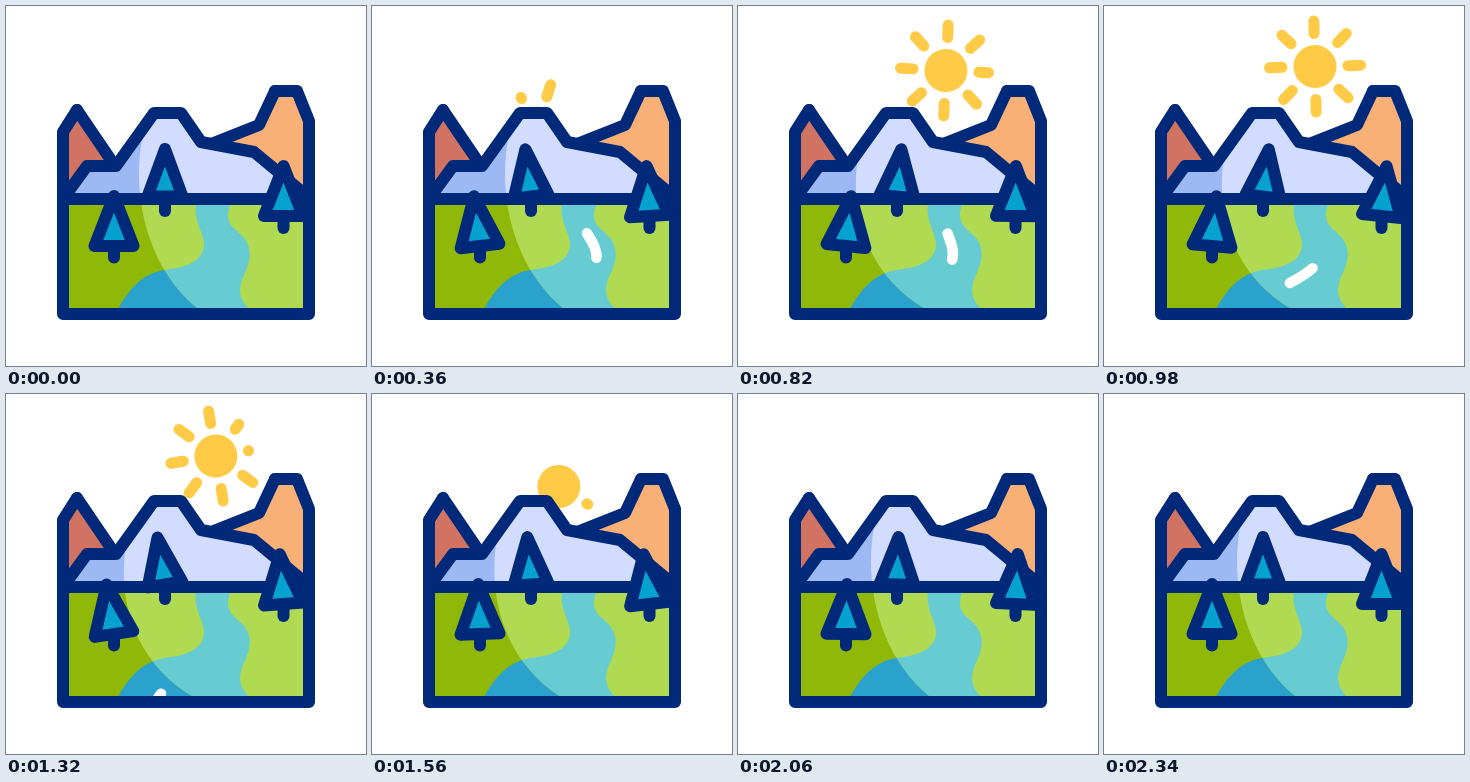
An HTML page for the animation above (2.4 s loop, 360 by 360 pixels).

```html
<!DOCTYPE html>
<html lang="en">
<head>
<meta charset="utf-8">
<title>Sunrise over the valley</title>
<style>
  html, body { margin: 0; width: 100%; height: 100%; overflow: hidden; background: #fff; }
  svg { display: block; width: 100vw; height: 100vh; }
  .line { fill: none; stroke: #00297a; stroke-width: 12; stroke-linecap: round; stroke-linejoin: round; }
  .tree { fill: #06a2cf; }
  .sun { fill: #ffcb47; stroke: #ffcb47; stroke-width: 11; stroke-linecap: round; }
  .glint { fill: none; stroke: #fff; stroke-width: 10.5; stroke-linecap: round; stroke-dasharray: 27 999; }
</style>
</head>
<body>
<svg viewBox="0 0 360 360">
  <defs>
    <path id="peak" d="M62 193V186L81 160H110L148 107H175L195 136L248 146L303 192V193Z"/>
    <path id="land" d="M57 193H303V308H57Z"/>
    <path id="river" d="M190 193V198C187 215 199 228 198 240C196 258 175 262 158 264C135 268 122 285 112 303V308H247L243 303C233 292 232 284 237 271C244 257 247 245 239 233C232 224 222 221 222 209C222 203 224 201 225 193Z"/>
    <clipPath id="shadeClip"><path id="shade"/></clipPath>
    <clipPath id="landClip"><use href="#land"/></clipPath>
  </defs>

  <g id="sun" class="sun"><circle r="21.5" stroke="none"/></g>

  <path fill="#d07363" d="M57 193V126L71 104L107 157L90 193Z"/>
  <path fill="#f8b077" d="M205 138L253 119L269 85H291L303 115V193H248Z"/>
  <path class="line" d="M71 104L107 157M205 138L253 119L269 85"/>

  <use href="#peak" fill="#d2dcfe"/>
  <use href="#land" fill="#b1da53"/>
  <use href="#river" fill="#67ccd1"/>
  <g clip-path="url(#shadeClip)">
    <use href="#peak" fill="#9cb9f3"/>
    <use href="#land" fill="#8fb808"/>
    <use href="#river" fill="#2aa2cd"/>
  </g>

  <g clip-path="url(#landClip)">
    <path id="glintA" class="glint" d="M206 190C206 212 212 222 216 229C222 238 226 246 224 254C219 272 203 278 203 292V340"/>
    <path id="glintB" class="glint" d="M224 190C212 198 204 202 205 210C207 228 218 240 214 254C211 264 195 272 184 278C168 284 160 292 152 304L140 325"/>
  </g>

  <path class="line" d="M62 186L81 160H110L148 107H175L195 136L248 146L300 189M57 193H303"/>
  <path class="line" d="M71 104L57 126V308H303V115L291 85H269"/>
  <g id="trees"></g>
</svg>
<script>
const LOOP = 2400;
const $ = id => document.getElementById(id);
const clamp = v => Math.max(0, Math.min(1, v));
const sine = p => (1 - Math.cos(Math.PI * clamp(p))) / 2;

function add(parent, name, attrs) {
  const el = document.createElementNS('http://www.w3.org/2000/svg', name);
  for (const k in attrs) el.setAttribute(k, attrs[k]);
  return parent.appendChild(el);
}

function makeTree(x, top, base, end, half, delay, amp) {
  add($('trees'), 'path', { class: 'line', d: `M${x} ${base}V${end}` });
  const el = add($('trees'), 'path', {
    class: 'line tree', style: 'fill:#06a2cf',
    d: `M${x} ${top}L${x - half} ${base}H${x + half}Z`
  });
  return t => el.setAttribute('transform', `rotate(${amp * swing(t - delay)} ${x} ${base})`);
}

const trees = [
  makeTree(108, 190, 240, 251.5, 19.5, 0, 7.4),
  makeTree(159, 143, 190.5, 205, 17.5, 45, 8.4),
  makeTree(277.5, 160, 210, 222, 19.5, 140, 6.9)
];

// Evenly timed turning points, eased in between.
function swing(t) {
  const turns = [0, -1, 0.9, -1.15, 0.5, 0, 0];
  const p = Math.max(0, t) / 443, i = Math.min(5, Math.floor(p));
  return turns[i] + (turns[i + 1] - turns[i]) * sine(p - i);
}

// Rays run counterclockwise; order is their turn to grow.
const rays = [7, 3, 0, 1, 2, 4, 5, 6].map((order, i) => ({
  grow: 285 + 70 * order,
  shrink: 1250 + 35 * i,
  el: add($('sun'), 'line', { x1: 33, transform: `rotate(${-45 * i})` })
}));

function drawSun(t) {
  const low = 1 - sine(t / 950) + sine((t - 1260) / 740);
  const spin = 33 - 0.0445 * t + 9.5e-6 * t * t;
  $('sun').setAttribute('transform',
    `translate(${211 - 68 * low} ${60.5 + 90 * low}) rotate(${spin})`);
  for (const { grow, shrink, el } of rays) {
    const size = clamp((t - grow) / 60) - clamp((t - shrink) / 71.5);
    el.setAttribute('x2', 33 + 12.5 * size);
    el.style.display = size > 0 ? '' : 'none';
  }
}

function drawShade(t) {
  const k = sine((t - 360) / 440) - sine((t - 1380) / 500);
  $('shade').setAttribute('d',
    `M0 100H${146 - 10 * k}C${120 - 14 * k} 160 ${132 - 25 * k} 255 ${192 - 5 * k} 303L${198 - 5 * k} 308H0Z`);
}

function drawGlint(el, shift) {
  el.style.display = shift > -27 && shift < 190 ? '' : 'none';
  el.style.strokeDashoffset = -shift;
}

function draw(t) {
  const u = t - 640;
  drawSun(t);
  drawShade(t);
  drawGlint($('glintA'), 0.24 * (t - 200));
  drawGlint($('glintB'), u * (0.274 - 7.8e-5 * u));
  trees.forEach(sway => sway(t));
}

const start = performance.now();
function tick() {
  draw((performance.now() - start) % LOOP);
  requestAnimationFrame(tick);
}
tick();
</script>
</body>
</html>
```
